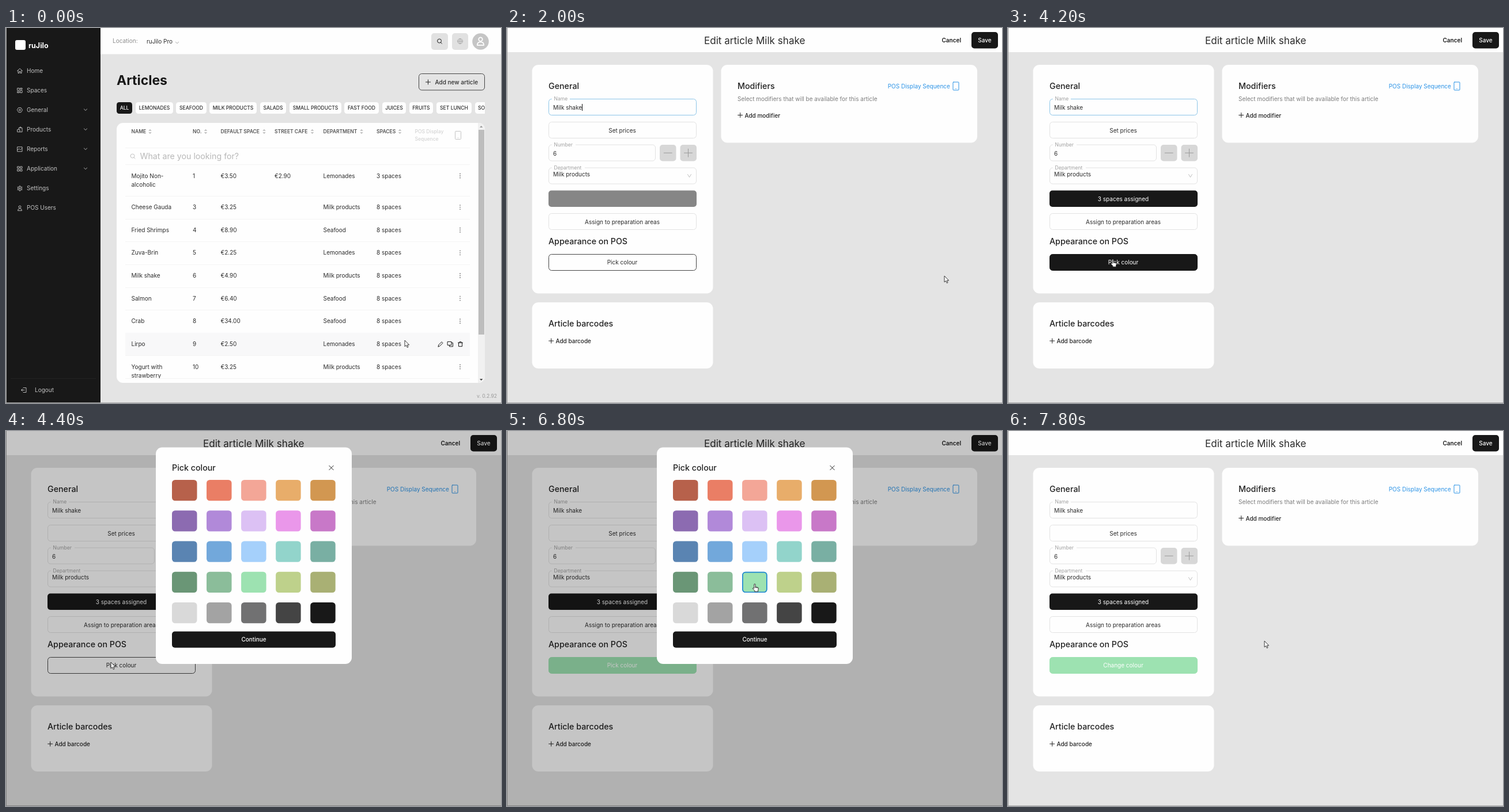
An HTML page for the animation above (8 s loop, 859 by 652 pixels).

```html
<!DOCTYPE html>
<html lang="en">
<head>
<meta charset="utf-8">
<title>Article editor</title>
<style>
html, body { margin: 0; width: 100%; height: 100%; overflow: hidden; background: #e4e4e4; }
svg { display: block; position: absolute; left: 0; top: 0; }
text { font-family: Inter, "Noto Sans", sans-serif; white-space: pre; }
.icon { fill: none; stroke-width: 1; stroke-linecap: round; stroke-linejoin: round; }
</style>
</head>
<body>
<svg id="stage" width="859" height="652" viewBox="0 0 859 652"></svg>
<script>
const INK = '#181818', BLUE = '#2b93e6', MINT = '#9de2b1', PAPER = '#fefefe';

// Text is placed by its vertical centre.
const text = (x, y, s, { size = 10, fill = '#2c2c2c', weight = 400, anchor = 'start', id = '' } = {}) =>
  `<text ${id && `id="${id}"`} x="${x}" y="${y + size * .36}" font-size="${size}" font-weight="${weight}" fill="${fill}" text-anchor="${anchor}">${s}</text>`;
const rect = (x, y, w, h, r, fill, extra = '') =>
  `<rect x="${x}" y="${y}" width="${w}" height="${h}" rx="${r}" fill="${fill}" ${extra}/>`;
const icon = (x, y, d, color, width = 1) =>
  `<path class="icon" transform="translate(${x} ${y})" d="${d}" stroke="${color}" stroke-width="${width}"/>`;
const line = (x1, x2, y, color) => `<path d="M${x1} ${y}H${x2}" stroke="${color}"/>`;
const circle = r => `M${-r} 0a${r} ${r} 0 1 0 ${2 * r} 0a${r} ${r} 0 1 0 ${-2 * r} 0`;

const glyph = {
  home: 'M-4.5 0L0-4 4.5 0M-3-1V4H-1V1H1V4H3V-1',
  grid: 'M-4-4H-1V0H-4ZM1-4H4V-2H1ZM1 0H4V4H1ZM-4 2H-1V4H-4Z',
  hex: 'M-2-4H2L4.5 0 2 4H-2L-4.5 0Z' + circle(1.5),
  bag: 'M-4 0H0V4H-4ZM-2-1V-3H4V4H0M0-3V-4.5H2V-3',
  chart: 'M-4-4H4V4H-4ZM-4 1L-1-1 1 1 4-2',
  tiles: 'M-4-4H-1V-1H-4ZM1-4H4V-1H1ZM-4 1H-1V4H-4ZM1 1H4V4H1Z',
  gear: circle(3.6) + circle(1.4) + 'M0-4.7V-3.6M0 4.7V3.6M-4-2.4L-3.1-1.8M4-2.4L3.1-1.8M-4 2.4L-3.1 1.8M4 2.4L3.1 1.8',
  user: 'M-2-2a2 2 0 1 0 4 0a2 2 0 1 0-4 0M-3.5 4.2Q-3.5.8 0 .8T3.5 4.2Z',
  logout: 'M-1-4H4V4H-1M1 0H-4.5M-2.5-2L-4.5 0-2.5 2',
  down: 'M-2.7-1.3L0 1.3 2.7-1.3',
  search: 'M-4-.5a3.5 3.5 0 1 0 7 0a3.5 3.5 0 1 0-7 0M1.7 2L4 4.2',
  globe: circle(4.5) + 'M-4.5 0H4.5M0-4.5Q-4 0 0 4.5M0-4.5Q4 0 0 4.5',
  plus: 'M-4 0H4M0-4V4',
  pencil: 'M-4 4L-3.2 1 2-4.2 4-2.2-1.2 3Z',
  copy: 'M-4.5-4H2V2H-4.5ZM-1.5 2V4.5H4.5V-2H2',
  trash: 'M-4-2.5H4M-1.5-2.5V-4H1.5V-2.5M-3-2.5V4H3V-2.5',
  close: 'M-3.7-3.7L3.7 3.7M3.7-3.7L-3.7 3.7',
  phone: 'M-4-7H4Q5-7 5-6V6Q5 7 4 7H-4Q-5 7-5 6V-6Q-5-7-4-7ZM-.3 4.5H.3',
};

const menu = [['Home', 'home'], ['Spaces', 'grid'], ['General', 'hex', 1], ['Products', 'bag', 1],
  ['Reports', 'chart', 1], ['Application', 'tiles', 1], ['Settings', 'gear'], ['POS Users', 'user']];
const chips = [['ALL', 192, 219], ['LEMONADES', 225, 290], ['SEAFOOD', 295, 348], ['MILK PRODUCTS', 353, 435],
  ['SALADS', 441, 486], ['SMALL PRODUCTS', 492, 582], ['FAST FOOD', 587, 647], ['JUICES', 653, 694],
  ['FRUITS', 700, 741], ['SET LUNCH', 747, 808]];
const headers = [['NAME', 217.5, 250], ['NO.', 324, 346.5], ['DEFAULT SPACE', 372.5, 448],
  ['STREET CAFE', 466, 531.5], ['DEPARTMENT', 550.5, 617], ['SPACES', 643, 683.5]];
const articles = [['Mojito Non-|alcoholic', 1, '3.50', 'Lemonades'], ['Cheese Gauda', 3, '3.25', 'Milk products'],
  ['Fried Shrimps', 4, '8.90', 'Seafood'], ['Zuva-Brin', 5, '2.25', 'Lemonades'],
  ['Milk shake', 6, '4.90', 'Milk products'], ['Salmon', 7, '6.40', 'Seafood'],
  ['Crab', 8, '34.00', 'Seafood'], ['Lirpo', 9, '2.50', 'Lemonades'], ['Yogurt with|strawberry', 10, '3.25', 'Milk products']];
const rowTop = i => i ? 292 + (i - 1) * 39.63 : 237.5;

function sidebar() {
  const items = menu.map(([name, g, sub], i) => {
    const y = 74 + i * 34.07;
    return icon(24, y + .5, glyph[g], '#b5b5b5') + text(36, y, name, { fill: '#c2c2c2' }) +
      (sub ? icon(138, y, glyph.down, '#a8a8a8') : '');
  });
  return rect(0, 0, 164, 652, 0, INK) + rect(16, 21, 18, 17, 3, '#fff') +
    text(39, 30, 'ruJilo', { size: 12.5, weight: 700, fill: '#fff' }) + items.join('') +
    line(8, 156, 609.5, '#232323') + icon(31, 629.5, glyph.logout, '#b5b5b5') + text(50, 629, 'Logout', { fill: '#c2c2c2' });
}

function topBar() {
  return rect(164, 0, 695, 45.5, 0, PAPER) + text(185, 22.5, 'Location:', { fill: '#8d8d8d' }) +
    text(244, 23, 'ruJilo Pro') + icon(297, 25.5, glyph.down, '#aaa') +
    rect(738, 9, 29, 29, 5, '#e1e1e1') + icon(752.5, 23, glyph.search, '#222', 1.2) +
    rect(774, 9, 28, 29, 5, '#e1e1e1') + icon(788, 23, glyph.globe, '#aaa') +
    '<circle cx="823.5" cy="23.5" r="14.3" fill="#c5c5c5"/>' +
    `<g transform="translate(823.5 23) scale(1.65)">${icon(0, 0, glyph.user, '#fff')}</g>`;
}

function tableRow([name, no, price, dept], i) {
  const top = rowTop(i), y = i ? top + 19.6 : 257;
  const cells = [[324, no], [372.5, '€' + price], [550.5, dept], [643, (i ? 8 : 3) + ' spaces']];
  if (!i) cells.push([466, '€2.90']);
  const dots = [-3.5, 0, 3.5].map(d => `<circle cx="788" cy="${y + d}" r=".9" fill="#777"/>`).join('');
  return `<g class="row"><g class="over">${rect(207, top, 598, 39.6, 0, '#f8f8f9')}</g>` +
    name.split('|').map((s, k) => text(217.5, y + k * 15.7, s)).join('') +
    cells.map(([x, s]) => text(x, y, s)).join('') + line(207, 805, Math.round(rowTop(i + 1)) + .5, '#f4f4f4') +
    `<g class="dots">${dots}</g><g class="over"><g class="pencil">${icon(754, y + .5, glyph.pencil, 'currentColor', 1.2)}</g>` +
    icon(771, y, glyph.copy, INK, 1.2) + icon(788.5, y + .3, glyph.trash, INK, 1.2) + '</g></g>';
}

function listPage() {
  const small = { size: 8.55, weight: 500, anchor: 'middle' };
  const tabs = chips.map(([s, a, b], i) => rect(a, 129, b - a, 20, 4.5, i ? PAPER : INK) +
    text((a + b) / 2, 139, s, { ...small, fill: i ? '#2c2c2c' : '#fff' }));
  const heads = headers.map(([s, x, sort]) => text(x, 180, s, { size: 8.55, weight: 600, fill: '#555' }) +
    `<path transform="translate(${sort} 180)" d="M-2.8-1.2L0-4 2.8-1.2ZM-2.8 1.2L0 4 2.8 1.2Z" fill="#b9b9b9"/>`);
  const faint = { size: 8.55, weight: 500, fill: '#d4d4d4' };
  return sidebar() + topBar() + text(192, 91, 'Articles', { size: 23, weight: 700, fill: INK }) +
    rect(716.5, 79.5, 114, 28.5, 5, 'none', 'stroke="#444"') + icon(732.5, 94, glyph.plus, '#222') +
    text(744.5, 94, 'Add new article', { weight: 500 }) + tabs.join('') +
    `<g clip-path="url(#tabClip)">${rect(814, 129, 30, 20, 4.5, PAPER)}${text(819, 139, 'SO', { ...small, anchor: 'start' })}</g>` +
    `<g clip-path="url(#tableClip)">${rect(192, 165, 639, 452, 0, PAPER)}` + heads.join('') +
    text(709.5, 180, 'POS Display', faint) + text(709.5, 193, 'Sequence', faint) + icon(784.5, 186.5, glyph.phone, '#c4c4c4') +
    line(207, 805, 208.5, '#f4f4f4') + icon(220, 223, glyph.search, '#c4c4c4') +
    text(232.5, 223, 'What are you looking for?', { size: 14.2, fill: '#b8b8b8' }) + line(207, 805, 237.5, '#f4f4f4') +
    articles.map(tableRow).join('') + rect(819, 165, 12, 452, 0, '#f1f1f1') + rect(820, 177, 10, 356, 0, '#bdbdbd') +
    '<path d="M822 173L824.7 170 827.4 173Z" fill="#999"/><path d="M822 610L824.7 613 827.4 610Z" fill="#444"/></g>' +
    text(817, 640, 'v. 0.2.92', { size: 8.55, fill: '#999' });
}

function editPage() {
  const box = (y, w = 256, h = 28, extra = 'stroke="#e2e2e2"') => rect(72.5, y + .5, w, h, 5, PAPER, extra);
  const mid = (y, s, o = {}) => text(200, y, s, { anchor: 'middle', ...o });
  const heading = (x, y, s) => text(x, y, s, { size: 14.25, weight: 500, fill: '#222' });
  const label = (y, s, w) => rect(78, y - 4, w, 9, 0, PAPER) + text(81.5, y, s, { size: 8.55, fill: '#a0a0a0' });
  const add = (x, y, s) => icon(x + 4.7, y - .5, glyph.plus, '#222') + text(x + 12.4, y, s, { weight: 500, fill: '#222' });
  return rect(0, 0, 859, 42, 0, PAPER) + text(429.7, 21.5, 'Edit article Milk shake', { size: 17.1, anchor: 'middle' }) +
    text(754.5, 21, 'Cancel', { weight: 600, fill: INK }) + rect(806, 7, 46, 28.5, 5, INK) +
    text(829, 21, 'Save', { weight: 500, fill: '#fff', anchor: 'middle' }) +
    rect(43.5, 64, 314, 397.5, 11, PAPER) + rect(43.5, 477, 314, 115, 11, PAPER) + rect(371.5, 64, 444.5, 135.5, 11, PAPER) +
    heading(72, 101, 'General') + box(123, 256, 28, 'id="nameBox"') + label(123, 'Name', 31) + text(80, 138, 'Milk shake') +
    rect(130, 132, 1, 12, 0, '#111', 'id="caret"') + box(163) + mid(178, 'Set prices') +
    box(202.5, 185) + label(202.5, 'Number', 41) + text(80, 218, '6') +
    rect(265, 203, 28.5, 28.5, 5, '#d7d7d7') + rect(300.5, 203, 28.5, 28.5, 5, '#d7d7d7') +
    icon(279.2, 217.2, 'M-7 0H7', '#999', 1.3) + icon(314.5, 217.2, 'M-7 0H7M0-7V7', '#999', 1.3) +
    box(242.5) + label(242.5, 'Department', 57) + text(80, 254, 'Milk products') + icon(316.5, 257, 'M-3-2.5L0 2.5 3-2.5', '#c0c0c0') +
    rect(72, 282.5, 257, 28.5, 5, INK, 'id="spaces"') + mid(297, '3 spaces assigned', { id: 'spacesText', fill: '#fff' }) +
    box(322) + mid(337, 'Assign to preparation areas') + heading(72, 371, 'Appearance on POS') +
    box(393, 256, 28, 'id="pick"') + mid(407.3, 'Pick colour', { id: 'pickText' }) +
    heading(72, 514, 'Article barcodes') + add(72, 544.5, 'Add barcode') +
    heading(400, 101, 'Modifiers') + text(400, 123.5, 'Select modifiers that will be available for this article', { fill: '#7c7c7c' }) +
    add(400, 152, 'Add modifier') + text(660.7, 101, 'POS Display Sequence', { fill: BLUE }) + icon(779, 101, glyph.phone, BLUE, 1.2);
}

const palette = ['b7614b', 'ea7e65', 'f3a697', 'e8ad6a', 'd29751', '8c6bb1', 'b189d9', 'dcc1f4', 'ea97ea', 'c878c8',
  '5a84b2', '72a8db', 'a5d0fb', '92d4cb', '79afa3', '6a9676', '8bbd9a', '9de2b1', 'bed18b', 'a9b074',
  'd9d9d9', 'a3a3a3', '717172', '444444', '181818'];
const swatchAt = i => [288 + i % 5 * 60.05, 85 + Math.floor(i / 5) * 53.25];

function colourDialog() {
  const swatches = palette.map((c, i) => rect(...swatchAt(i), 43.5, 36.3, 5.5, '#' + c)).join('');
  const [x, y] = swatchAt(17);
  return rect(0, 0, 859, 652, 0, '#000', 'opacity=".225"') + rect(260, 28.5, 340, 376.5, 11, PAPER) +
    text(288, 64, 'Pick colour', { size: 14.25, weight: 500, fill: '#222' }) + icon(564.5, 64, glyph.close, '#222', 1.2) + swatches +
    rect(x + .8, y + .8, 41.9, 34.7, 5, 'none', `id="chosen" stroke="#1f86d6" stroke-width="1.7"`) +
    rect(288, 348.5, 284, 28.3, 5, INK, 'id="go"') + text(430, 362.5, 'Continue', { fill: '#fff', weight: 500, anchor: 'middle' });
}

document.getElementById('stage').innerHTML =
  `<clipPath id="tabClip">${rect(800, 120, 31, 40, 0, '#000')}</clipPath>
  <clipPath id="tableClip">${rect(192, 165, 639, 452, 11, '#000')}</clipPath>` +
  rect(0, 0, 859, 652, 0, '#e4e4e4') + `<g id="list">${listPage()}</g><g id="edit">${editPage()}</g>` +
  rect(0, 0, 1, 652, 0, '#a8a8a8') + rect(0, 651, 859, 1, 0, '#a8a8a8') + `<g id="dialog">${colourDialog()}</g>
  <g id="cursor" stroke="#222" stroke-width=".9" stroke-linejoin="round" fill="#fff">
    <path id="arrow" d="M0 0V10.8L2.5 8.6 4.3 12.5 6 11.7 4.3 8H7.7Z"/>
    <path id="hand" d="M-1.2 1a1.1 1.1 0 0 1 2.2 0V5L5.2 6Q6.5 6.4 6.4 8L5.6 11V13.2H-.2V11.5L-3.8 7.8Q-3.6 5.9-1.2 7.6ZM1 5V7M3 5.5V7.2M5 6V7.5"/>
  </g>`;

const $ = id => document.getElementById(id);
const show = (el, on) => el.setAttribute('display', on ? 'inline' : 'none');
const paint = (id, attrs) => Object.entries(attrs).forEach(([k, v]) => $(id).setAttribute(k, v));
const rows = [...document.querySelectorAll('.row')];

// Pointer tip: time, x, y
const path = [[0, 692, 543], [1400, 758, 431], [2000, 759, 431], [2400, 759, 431], [3800, 182, 402], [4400, 182, 402],
  [6000, 401, 280], [6400, 430, 266], [6800, 430, 266], [7400, 444, 366], [7800, 445, 365], [8000, 445, 365]];

function pointer(t) {
  const i = path.findIndex(([end]) => t < end);
  const [t0, x0, y0] = path[i - 1], [t1, x1, y1] = path[i];
  const u = (t - t0) / (t1 - t0), s = u * u * (3 - 2 * u);
  return [x0 + (x1 - x0) * s, y0 + (y1 - y0) * s];
}

function draw(t) {
  const [x, y] = pointer(t);
  const inside = (a, b, w, h) => x >= a && x <= a + w && y >= b && y <= b + h;
  const listing = t < 2000, dialog = t >= 4400 && t < 7800, chosen = t >= 6800, done = t >= 7800;
  const onPencil = listing && inside(748, 425, 13, 11);
  const onPick = !listing && !dialog && !done && inside(72, 393, 257, 28);
  const onGo = dialog && inside(288, 348, 284, 29);
  const onSwatch = dialog && palette.some((_, i) => inside(...swatchAt(i), 43.5, 36.3));
  show($('list'), listing);
  show($('edit'), !listing);
  show($('dialog'), dialog);

  rows.forEach((row, i) => {
    const over = y >= rowTop(i) && y < rowTop(i + 1);
    row.querySelectorAll('.over').forEach(el => show(el, over));
    show(row.querySelector('.dots'), !over);
    row.querySelector('.pencil').style.color = onPencil ? BLUE : INK;
  });

  const focused = t < 4400;
  paint('nameBox', { stroke: focused ? '#8cc5e8' : '#e2e2e2' });
  show($('caret'), focused && (t - 2000) % 1200 < 600);
  paint('spaces', { fill: t < 2200 ? '#868686' : INK });
  show($('spacesText'), t >= 2200);
  paint('pick', { fill: chosen ? MINT : onPick ? INK : PAPER, stroke: chosen ? MINT : onPick ? INK : '#444' });
  paint('pickText', { fill: chosen || onPick ? '#fff' : '#2c2c2c' });
  $('pickText').textContent = done ? 'Change colour' : 'Pick colour';
  show($('chosen'), chosen);
  paint('go', { fill: onGo ? '#3fa6fd' : INK });

  const hand = onPencil || onPick || onGo || onSwatch;
  show($('hand'), hand);
  show($('arrow'), !hand);
  paint('cursor', { transform: `translate(${x} ${y})` });
}

function tick() {
  draw(Math.floor(performance.now() % 8000 / 200) * 200);
  requestAnimationFrame(tick);
}
tick();
</script>
</body>
</html>
```
